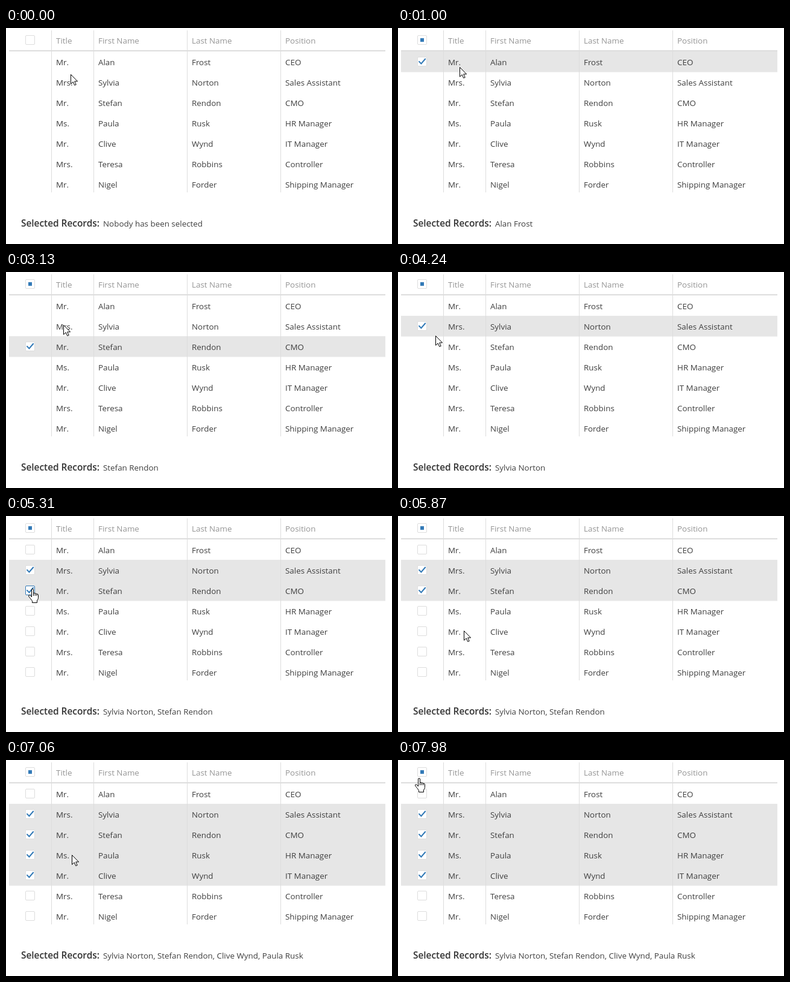
An HTML page for the animation above (8 s loop, 640 by 360 pixels).

```html
<!DOCTYPE html>
<html lang="en">
<head>
<meta charset="utf-8">
<title>Row selection</title>
<style>
  html, body { margin: 0; width: 100%; height: 100%; overflow: hidden; background: #fff; }
  svg { display: block; width: 640px; height: 360px; }
  text { font: 13.4px "Open Sans", "Noto Sans", sans-serif; fill: #3f3f3f; white-space: pre; }
  .head { fill: #959595; }
  .label { font-size: 15.4px; font-weight: 600; fill: #333; }
  .box { fill: #fff; stroke: #ddd; }
  .hover .box { stroke: #337ab7; }
  .tick { fill: none; stroke: #337ab7; stroke-width: 2; }
  .cursor { fill: #fff; stroke: #000; stroke-linejoin: round; }
</style>
</head>
<body>
<svg id="stage" viewBox="0 0 640 360"></svg>
<script>
const DURATION = 8000;
const ROW_TOP = 39, ROW_HEIGHT = 34;
const COLUMNS = [75, 145, 300, 455];
const HEADERS = ['Title', 'First Name', 'Last Name', 'Position'];
const PEOPLE = [
  ['Mr.', 'Alan', 'Frost', 'CEO'],
  ['Mrs.', 'Sylvia', 'Norton', 'Sales Assistant'],
  ['Mr.', 'Stefan', 'Rendon', 'CMO'],
  ['Ms.', 'Paula', 'Rusk', 'HR Manager'],
  ['Mr.', 'Clive', 'Wynd', 'IT Manager'],
  ['Mrs.', 'Teresa', 'Robbins', 'Controller'],
  ['Mr.', 'Nigel', 'Forder', 'Shipping Manager']
];

// Selected rows, in order of selection, from each time on
const SELECTIONS = [
  [0, []], [1000, [0]], [2000, [2]], [3260, [1]],
  [4850, [1, 2]], [6030, [1, 2, 4]], [7060, [1, 2, 4, 3]]
];
const ALL_BOXES_FROM = 4850;
const HOVER = { row: 2, from: 4390, to: 5870 };

const smooth = p => p * p * (3 - 2 * p);
const linear = p => p;

// Pointer stops: time, x, y, easing of the way there
const PATH = [
  [0, 107, 77], [350, 107, 77], [640, 102, 65],
  [1230, 102, 65], [1740, 98, 125],
  [2730, 98, 125], [3060, 95, 88],
  [3930, 95, 88], [4240, 62, 106, linear], [4390, 43, 120, linear],
  [5290, 43, 120], [5550, 114, 188], [5670, 109, 191],
  [6200, 109, 191], [6560, 109, 158],
  [7590, 109, 158], [7980, 35, 30], [DURATION, 35, 30]
];

const rowY = i => ROW_TOP + i * ROW_HEIGHT;
const cells = (values, baseline, cls = '') => values.map((value, i) =>
  `<text class="${cls}" x="${COLUMNS[i] + 8}" y="${baseline}">${value}</text>`).join('');
const checkbox = (y, mark) =>
  `<rect class="box" x="32.5" y="${y + .5}" width="15" height="15" rx="1.5"/>${mark}`;
const tick = y => `<path class="tick" d="M34.5 ${y + 7.4}l3.9 4 7.3-8.4"/>`;

document.getElementById('stage').innerHTML = `
  ${PEOPLE.map((_, i) =>
    `<rect class="band" x="5" y="${rowY(i)}" width="624" height="34.5" fill="#e6e6e6"/>`).join('')}
  ${COLUMNS.map(x => `<rect x="${x}" y="4" width="1" height="270" fill="#ddd"/>`).join('')}
  <rect x="5" y="37" width="624" height="2" fill="#ddd"/>
  ${checkbox(12, '<rect id="partial" x="37" y="17" width="6" height="6" fill="#337ab7"/>')}
  ${cells(HEADERS, 26, 'head')}
  ${PEOPLE.map((person, i) => `<g class="check">${checkbox(rowY(i) + 9, tick(rowY(i) + 9))}</g>
    ${cells(person, rowY(i) + 23)}`).join('')}
  <text class="label" x="25" y="331">Selected Records:</text>
  <text id="names" x="161" y="331"></text>
  <path id="arrow" class="cursor" d="M.5 .5V16.2L4.2 12.8 6.7 18.4 9.2 17.4 6.7 11.9H11.6Z"/>
  <g id="hand" class="cursor"><g transform="translate(-7 0)">
    <path d="M5.5 14V2a1.5 1.5 0 0 1 3 0V7.6Q10.2 6.8 11.2 8.2 12.9 7.4 13.9 9 16.5 8.6 16.5 11V15.5
      Q16.5 17.5 14.5 20V23.5H6.5V20.5Q3.5 16.5 .7 13 0 10.8 2 10.6 3.5 11 5.5 14Z"/>
    <path fill="none" d="M8.5 7.6V12M11.2 8.2V12M13.9 9V12"/>
  </g></g>`;

const byId = id => document.getElementById(id);
const bands = document.querySelectorAll('.band');
const checks = document.querySelectorAll('.check');
const ticks = document.querySelectorAll('.tick');
const show = (element, visible) => element.style.display = visible ? '' : 'none';

function pointerAt(t) {
  const next = PATH.findIndex(stop => stop[0] > t);
  const [t0, x0, y0] = PATH[next - 1];
  const [t1, x1, y1, ease = smooth] = PATH[next];
  const p = ease((t - t0) / (t1 - t0));
  return [Math.round(x0 + (x1 - x0) * p), Math.round(y0 + (y1 - y0) * p)];
}

function render(t) {
  const selected = SELECTIONS.filter(([start]) => start <= t).pop()[1];
  const [x, y] = pointerAt(t);
  const rowUnder = Math.floor((y - ROW_TOP) / ROW_HEIGHT);
  const inBox = x >= 32 && x < 48 && Math.abs(y - rowY(rowUnder) - 17) <= 8;
  const isHand = y < ROW_TOP || inBox;

  PEOPLE.forEach((_, i) => {
    const isSelected = selected.includes(i);
    const isHovered = x < COLUMNS[0] && rowUnder === i;
    show(bands[i], isSelected);
    show(ticks[i], isSelected);
    show(checks[i], isSelected || isHovered || t >= ALL_BOXES_FROM);
    checks[i].classList.toggle('hover', i === HOVER.row && t >= HOVER.from && t < HOVER.to);
  });
  show(byId('partial'), selected.length);
  byId('names').textContent =
    selected.map(i => PEOPLE[i].slice(1, 3).join(' ')).join(', ') || 'Nobody has been selected';

  show(byId('arrow'), !isHand);
  show(byId('hand'), isHand);
  for (const id of ['arrow', 'hand']) byId(id).setAttribute('transform', `translate(${x} ${y})`);
}

const start = performance.now();
function animate() {
  render((performance.now() - start) % DURATION);
  requestAnimationFrame(animate);
}
animate();
</script>
</body>
</html>
```
